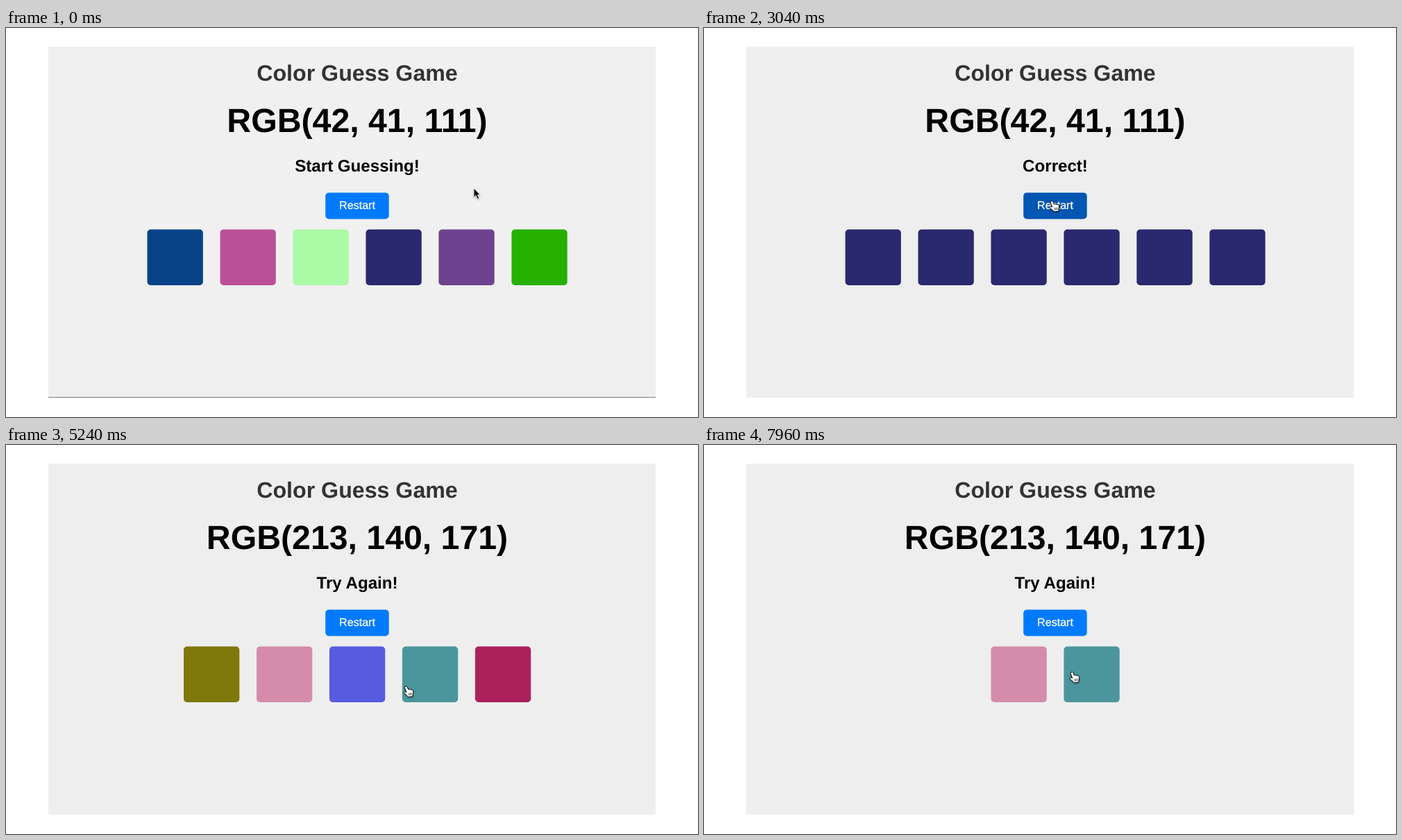
Animation, 997 px wide and 561 px high, one loop 8000 ms. Source, as an HTML page:

```html
<!DOCTYPE html>
<html lang="en">
<head>
<meta charset="utf-8">
<title>Color Guess Game</title>
<style>
  html, body { margin: 0; width: 100%; height: 100%; overflow: hidden; background: #fff; }
  svg { display: block; width: 997px; height: 561px; }
  text { font-family: "Liberation Sans", Arial, sans-serif; text-anchor: middle; text-rendering: geometricPrecision; }
  .bold { font-weight: 700; }
  #cursor { filter: drop-shadow(0 1px 1px rgba(0, 0, 0, .35)); }
</style>
</head>
<body>
<svg viewBox="0 0 997 561">
  <rect id="page" x="61" y="27" width="875" height="506"/>
  <rect id="edge" x="61" y="532" width="875" height="1.2" fill="#858585"/>
  <text class="bold" x="506" y="75.6" font-size="32.16" fill="#333">Color Guess Game</text>
  <text class="bold" id="goal" x="506" y="149.6" font-size="48.24"></text>
  <text class="bold" id="status" x="506" y="207" font-size="24.12"></text>
  <rect id="button" x="460.2" y="237.4" width="91.5" height="38.1" rx="5"/>
  <text x="506" y="261.4" font-size="16.08" fill="#fff" stroke="#fff" stroke-width=".3">Restart</text>
  <g id="tiles"></g>
  <g id="cursor">
    <path id="arrow" d="M0 0V13.2L3 10.4L5.3 15.6L7.6 14.6L5.4 9.6H9.2Z" stroke="#fff" stroke-width=".9"/>
    <g id="hand" stroke="#000" stroke-linejoin="round" stroke-linecap="round">
      <path fill="#fff" d="M-1.2 .6C-.2-.5 1.2-.2 1.8 1L3.6 4.8C4.6 4 5.7 4.2 6.2 5C7.2 4.4 8.2 4.7 8.6 5.5C9.8 5.2 10.5 5.8 10.6 7C10.8 8.7 10.7 10.2 10.2 11.6L9.7 14.8L3.6 15.4C2.2 13.8 .2 12.6-1.4 11C-2.8 9.7-3.3 8.9-2.5 8.2C-1.8 7.5-.6 8 .6 8.8L-1.5 3C-1.9 1.9-1.9 1-1.2 .6Z"/>
      <path fill="none" stroke-width=".7" d="M4 10L4.6 13M6 9.8L6.5 12.8M8 9.6L8.4 12.5"/>
    </g>
  </g>
</svg>
<script>
const LOOP = 8000, SIZE = 80.3, PITCH = 104.97, TOP = 290.6, MID = 506.1;
const $ = id => document.getElementById(id);

const first = ['#084287', '#ba5198', '#abfaa6', '#2a286e', '#6e428e', '#26b000'];
const second = ['#7f780a', '#502254', '#d58cab', '#565be0', '#4b969c', '#ab215c'];
const solved = Array(6).fill(first[3]);

// Cursor moves: start, end, x, y
const moves = [
  [480, 1080, 570, 341.5],
  [2300, 2800, 501, 249.5],
  [3480, 4160, 326, 324],
  [4720, 5571, 702, 360],
  [5960, 6640, 353, 339.5],
  [7000, 7200, 344, 341],
  [7200, 7700, 530, 327.5]
];
// Wrong guesses: click time, index in the second set
const misses = [[4500, 1], [5740, 5], [6760, 0], [7780, 3]];
const WIN = 1200, RESTART = 3240;

const clamp = v => Math.max(0, Math.min(1, v));
const smooth = v => v * v * (3 - 2 * v);

const tiles = first.map(() => {
  const r = document.createElementNS('http://www.w3.org/2000/svg', 'rect');
  const attrs = { y: TOP, width: SIZE, height: SIZE, rx: 5 };
  for (const k in attrs) r.setAttribute(k, attrs[k]);
  return $('tiles').appendChild(r);
});

function cursorAt(t) {
  let x = 674, y = 231;
  for (const [a, b, nx, ny] of moves) {
    const k = smooth(clamp((t - a) / (b - a)));
    x += (nx - x) * k;
    y += (ny - y) * k;
  }
  return [x, y];
}

function colorsAt(t) {
  if (t < WIN) return first;
  if (t < RESTART) return solved;
  const gone = misses.filter(m => t >= m[0]).map(m => m[1]);
  return second.filter((c, i) => !gone.includes(i));
}

function statusAt(t) {
  if (t >= misses[0][0]) return 'Try Again!';
  return t >= WIN && t < RESTART ? 'Correct!' : 'Start Guessing!';
}

function put(id, text) {
  if ($(id).textContent !== text) $(id).textContent = text;
}

function render(t) {
  const colors = colorsAt(t), [x, y] = cursorAt(t);
  const left = MID - (colors.length * PITCH - PITCH + SIZE) / 2;
  let over = x > 460 && x < 552 && y > 237 && y < 275.5;

  tiles.forEach((tile, i) => {
    const tx = left + i * PITCH, shown = i < colors.length;
    tile.setAttribute('visibility', shown ? 'visible' : 'hidden');
    if (!shown) return;
    tile.setAttribute('x', tx);
    tile.setAttribute('fill', colors[i]);
    if (x >= tx && x <= tx + SIZE && y >= TOP && y <= TOP + SIZE) over = true;
  });

  const hover = smooth(clamp((t - 2620) / 300)) - smooth(clamp((t - 3700) / 300));
  $('button').setAttribute('fill', `rgb(0,${123 - 37 * hover},${255 - 76 * hover})`);
  $('page').setAttribute('fill', t < 480 ? '#f0f0f0' : '#eee');
  $('edge').setAttribute('visibility', t < 480 ? 'visible' : 'hidden');
  put('goal', t < RESTART ? 'RGB(42, 41, 111)' : 'RGB(213, 140, 171)');
  put('status', statusAt(t));

  $('cursor').setAttribute('transform', `translate(${x} ${y})`);
  $('hand').setAttribute('visibility', over ? 'visible' : 'hidden');
  $('arrow').setAttribute('visibility', over ? 'hidden' : 'visible');
}

const start = performance.now();
function tick() {
  render((performance.now() - start) % LOOP);
  requestAnimationFrame(tick);
}
tick();
</script>
</body>
</html>
```
